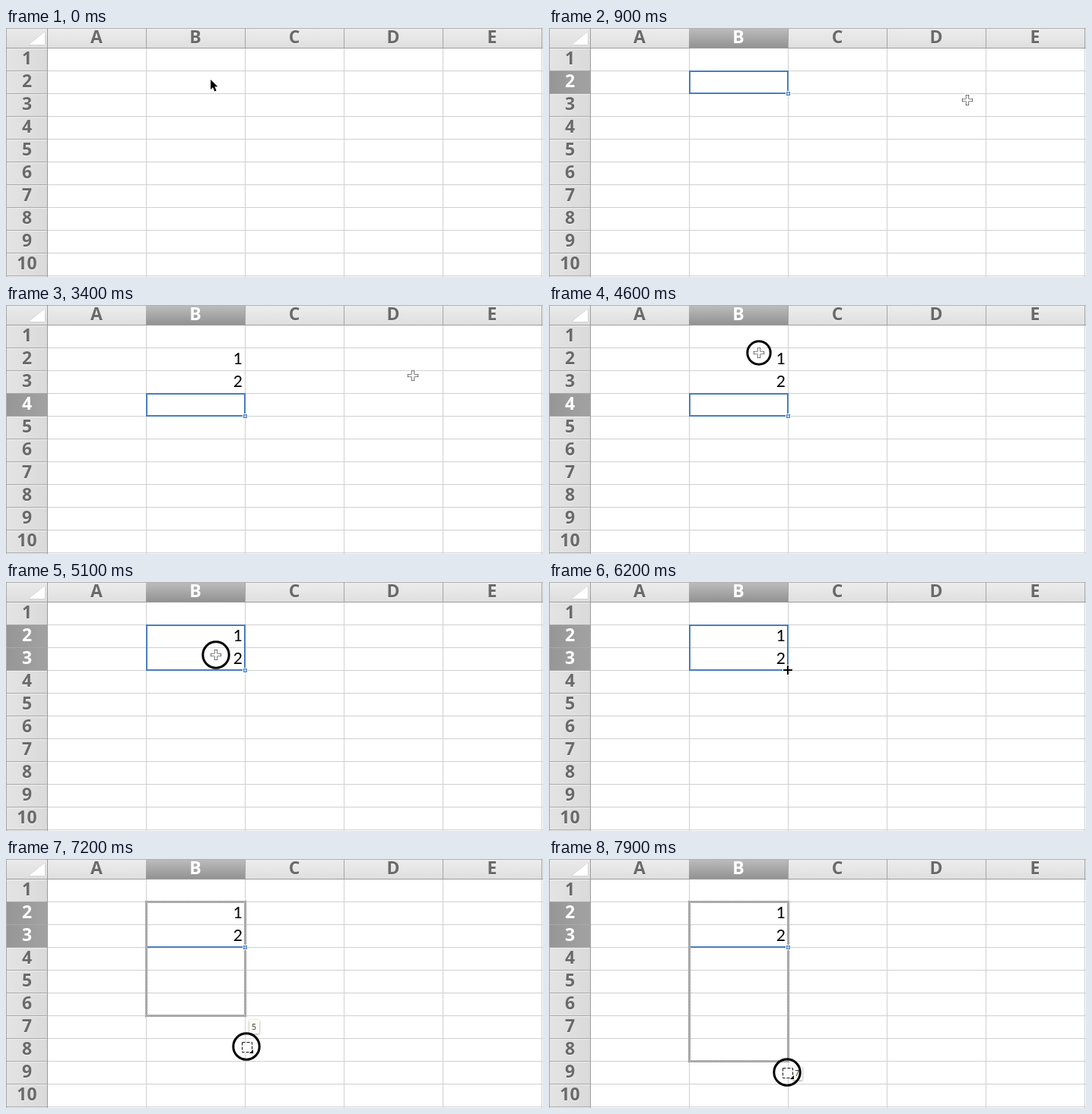
An HTML page with a canvas that plays this animation: 706x328 px, repeating every 8 s.

```html
<!DOCTYPE html>
<html lang="en">
<head>
<meta charset="utf-8">
<title>Spreadsheet fill handle</title>
<style>
html, body { margin: 0; width: 100%; height: 100%; overflow: hidden; background: #fff; }
canvas { display: block; }
</style>
</head>
<body>
<canvas id="stage" width="706" height="328"></canvas>
<script>
const W = 706, H = 328, LOOP = 8000, STEP = 100;
const LEFT = 54, TOP = 26, COL = 130, ROW = 30;
const BX = LEFT + COL;
const BLUE = '#4a7dbd';
const HEAD_FONT = 'bold 23px "Noto Sans", "Open Sans", sans-serif';
const CELL_FONT = '21px Lato, "Open Sans", sans-serif';
const ctx = document.getElementById('stage').getContext('2d');

// Pointer path: time, x, y, linear segment
const PATH = [
  [0, 269, 68], [600, 269, 68], [900, 550, 95], [3300, 550, 95],
  [4000, 276, 63], [4700, 276, 63], [5200, 276, 100], [5400, 276, 100],
  [5900, 314, 116], [6700, 314, 116], [7200, 316, 247, 1],
  [7500, 315, 274, 1], [7700, 313, 283], [7900, 313, 281], [8000, 313, 281]
];

const rowY = r => TOP + (r - 1) * ROW;

function pointerAt(t) {
  const i = Math.max(1, PATH.findIndex(k => k[0] >= t));
  const a = PATH[i - 1], b = PATH[i];
  let u = Math.max(0, (t - a[0]) / (b[0] - a[0]));
  if (!b[3]) u = u * u * (3 - 2 * u);
  return { x: Math.round(a[1] + (b[1] - a[1]) * u), y: Math.round(a[2] + (b[2] - a[2]) * u) };
}

function rect(x, y, w, h, color) {
  ctx.fillStyle = color;
  ctx.fillRect(x, y, w, h);
}

function text(s, x, y, font, color, align) {
  ctx.font = font;
  ctx.textAlign = align;
  ctx.fillStyle = color;
  ctx.fillText(s, x, y);
}

function poly(points, fill, stroke, width) {
  ctx.beginPath();
  points.forEach(([x, y]) => ctx.lineTo(x, y));
  ctx.closePath();
  if (stroke) {
    ctx.strokeStyle = stroke;
    ctx.lineWidth = width;
    ctx.stroke();
  }
  if (fill) {
    ctx.fillStyle = fill;
    ctx.fill();
  }
}

function ramp(x, y, dx, dy, from, to) {
  const g = ctx.createLinearGradient(x, y, x + dx, y + dy);
  g.addColorStop(0, from);
  g.addColorStop(1, to);
  return g;
}

function checker() {
  const tile = document.createElement('canvas');
  tile.width = tile.height = 2;
  const c = tile.getContext('2d');
  c.fillStyle = '#fff';
  c.fillRect(0, 0, 2, 2);
  c.fillStyle = '#555';
  c.fillRect(0, 0, 1, 1);
  c.fillRect(1, 1, 1, 1);
  return ctx.createPattern(tile, 'repeat');
}
const DOTS = checker();

function label(s, x, y, on) {
  if (!on) text(s, x, y + 1, HEAD_FONT, '#f6f6f6', 'center');
  text(s, x, y, HEAD_FONT, on ? '#fff' : '#6a6a6a', 'center');
}

function sheet(first, last) {
  rect(0, 0, W, H, '#fff');
  for (let x = LEFT + COL; x < W; x += COL) rect(x, TOP, 1, H, '#d0d0d0');
  for (let y = TOP + ROW; y < H; y += ROW) rect(LEFT, y, W, 1, '#d0d0d0');

  rect(0, 0, W, TOP, ramp(0, 0, 0, TOP, '#ededed', '#dfdfdf'));
  for (let c = 0; c < 5; c++) {
    const x = LEFT + c * COL, on = c === 1 && first > 0;
    if (on) rect(x, 0, COL, TOP, ramp(0, 0, 0, TOP, '#bdbdbd', '#929292'));
    rect(x + COL, 0, 1, TOP, '#a5a5a5');
    label('ABCDE'[c], x + 65, 20, on);
  }
  rect(0, 0, W, 1, '#b0b0b0');

  for (let r = 1; r <= 11; r++) {
    const y = rowY(r), on = r >= first && r <= last;
    rect(0, y, LEFT, ROW, on ? ramp(0, 0, LEFT, 0, '#969696', '#a2a2a2')
                             : ramp(0, 0, LEFT, 0, '#e4e4e4', '#dadada'));
    if (!on) rect(1, y + 1, LEFT - 1, 1, '#f0f0f0');
    rect(0, y, LEFT, 1, '#a8a8a8');
    if (r < 11) label(String(r), 27.5, y + 22, on);
  }
  rect(0, 0, LEFT, TOP, ramp(0, 0, 0, TOP, '#ebebeb', '#dedede'));
  poly([[51, 5], [51, 22], [30, 22]], '#fff', '#c4c4c4', 1);
  rect(0, 0, LEFT, 1, '#b0b0b0');
  rect(0, 0, 1, H, '#a8a8a8');
  rect(LEFT, 0, 1, H, '#9c9c9c');
  rect(0, TOP, W, 1, '#9c9c9c');
}

function handle(y) {
  rect(BX + COL - 3, y - 3, 7, 7, '#fff');
  rect(BX + COL - 2, y - 2, 5, 5, BLUE);
  rect(BX + COL - 1, y - 1, 3, 3, '#a9cdf2');
}

function selection(first, last) {
  const y = rowY(first), h = rowY(last + 1) - y;
  ctx.strokeStyle = BLUE;
  ctx.lineWidth = 2;
  ctx.strokeRect(BX + 1, y + 1, COL - 1, h - 1);
  handle(y + h);
}

function editor(row, value) {
  const y = rowY(row);
  ctx.save();
  ctx.shadowColor = 'rgba(0,0,0,.5)';
  ctx.shadowBlur = 4;
  ctx.shadowOffsetY = 2;
  rect(BX, y, COL + 1, ROW + 1, '#fff');
  ctx.restore();
  ctx.strokeStyle = BLUE;
  ctx.lineWidth = 1;
  ctx.strokeRect(BX + 0.5, y + 0.5, COL, ROW);
  handle(y + ROW);
  text(value, BX + 4, y + 22, CELL_FONT, '#000', 'left');
  rect(BX + 16, y + 4, 1, 21, '#000');
}

function fillPreview(bottom) {
  ctx.strokeStyle = DOTS;
  ctx.lineWidth = 3;
  ctx.strokeRect(BX + 0.5, rowY(2) + 0.5, COL, bottom - rowY(2));
  rect(BX + 2, rowY(4) - 1, COL - 3, 2, BLUE);
  handle(rowY(4));
}

function tip(value, y) {
  ctx.save();
  ctx.shadowColor = 'rgba(0,0,0,.4)';
  ctx.shadowBlur = 3;
  ctx.shadowOffsetY = 1;
  rect(320, y - 9, 13, 18, '#fdfdf6');
  ctx.restore();
  text(value, 326, y + 4, '10px "Open Sans", sans-serif', '#222', 'center');
}

function plus(x, y, arm, half, fill, stroke, width) {
  const a = arm, h = half;
  poly([[-h, -a], [h, -a], [h, -h], [a, -h], [a, h], [h, h],
        [h, a], [-h, a], [-h, h], [-a, h], [-a, -h], [-h, -h]]
    .map(([px, py]) => [x + px, y + py]), fill, stroke, width);
}

const cursors = {
  arrow(x, y) {
    const shape = [[0, 0], [0, 13], [3, 10.2], [5.3, 15.5], [7.6, 14.5], [5.4, 9.3], [9.3, 9.3]];
    poly(shape.map(([px, py]) => [x + px, y + py]), '#000', '#fff', 2);
  },
  cross(x, y) {
    plus(x, y, 7.5, 2.5, '#fff', '#fff', 2);
    plus(x, y, 6.5, 1.5, '#fff', '#111', 1.2);
  },
  thin(x, y) {
    plus(x, y, 6, 1, '#000', '#fff', 2);
  },
  fill(x, y) {
    rect(x - 6, y - 6, 15, 15, 'rgba(255,255,255,.85)');
    ctx.strokeStyle = '#111';
    ctx.lineWidth = 1;
    ctx.setLineDash([4, 2]);
    ctx.strokeRect(x - 5.5, y - 5.5, 13, 13);
    ctx.setLineDash([]);
    poly([[x + 9, y + 4], [x + 9, y + 9], [x + 4, y + 9]], '#111');
  }
};

function ring(x, y, r) {
  ctx.beginPath();
  ctx.arc(x, y, r, 0, Math.PI * 2);
  ctx.strokeStyle = '#000';
  ctx.lineWidth = 3;
  ctx.stroke();
}

function selectedRows(t, y) {
  if (t < 400) return [0, 0];
  if (t < 2100) return [2, 2];
  if (t < 2600) return [3, 3];
  if (t < 4700) return [4, 4];
  return t >= 5200 || y >= rowY(3) ? [2, 3] : [2, 2];
}

function cursorKind(t) {
  if (t < 400 || (t >= 2200 && t < 2700)) return 'arrow';
  if (t < 5900) return 'cross';
  return t < 6800 ? 'thin' : 'fill';
}

function draw(time) {
  const t = Math.floor(time / STEP) * STEP;
  const { x, y } = pointerAt(t);
  const rows = selectedRows(t, y);
  sheet(...rows);

  if (t >= 2100) text('1', 311, 78, CELL_FONT, '#000', 'right');
  if (t >= 2600) text('2', 311, 108, CELL_FONT, '#000', 'right');

  // The preview trails the pointer by one step
  const trail = pointerAt(t - STEP).y;
  const bottom = TOP + Math.floor((trail - TOP) / ROW) * ROW;
  if (t >= 1900 && t < 2100) editor(2, '1');
  else if (t >= 2300 && t < 2600) editor(3, '2');
  else if (t >= 6800) {
    fillPreview(Math.max(bottom, rowY(4)));
    if (bottom > rowY(4)) tip(String((bottom - rowY(2)) / ROW), trail);
  } else if (rows[0]) selection(...rows);

  cursors[cursorKind(t)](x, y);
  const pressed = t >= 6400 ? t - 6400 : t >= 4600 && t < 5400 ? t - 4600 : -1;
  if (pressed >= 0) ring(x, y, Math.min(17.2, 15.2 + pressed / 100));
}

function tick(now) {
  draw(now % LOOP);
  requestAnimationFrame(tick);
}
draw(0);
requestAnimationFrame(tick);
</script>
</body>
</html>
```
